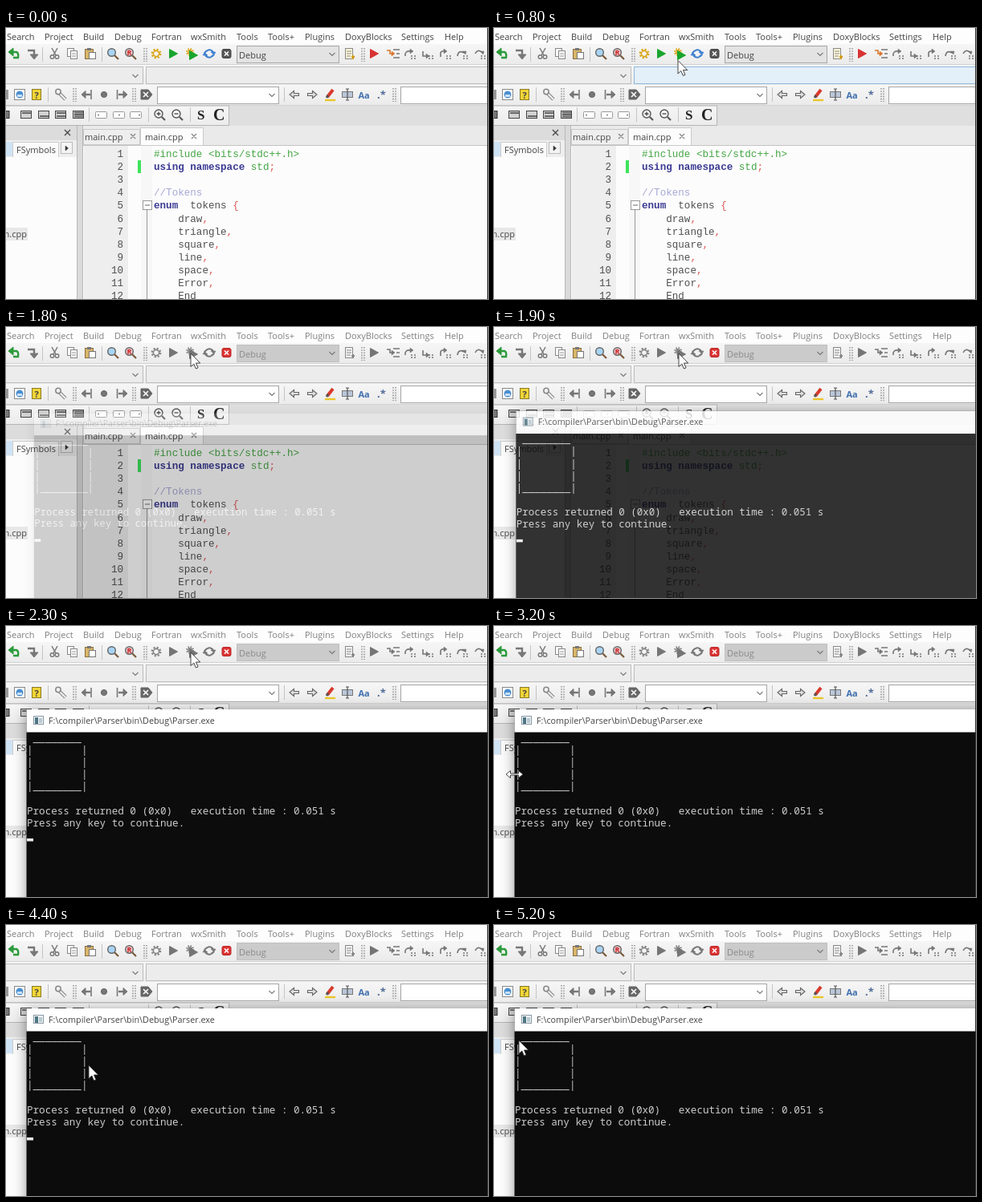
An HTML page for the animation above (5300 ms loop, 600 by 338 pixels).

```html
<!DOCTYPE html>
<html lang="en">
<head>
<meta charset="utf-8">
<title>Compile and run</title>
<style>
html, body { margin: 0; width: 100%; height: 100%; overflow: hidden; background: #f0f0f0; }
svg { display: block; width: 600px; height: 338px; }
text { white-space: pre; }
.ui { font: 11px "Open Sans", "Noto Sans", sans-serif; fill: #444; }
.code { font: 12.58px "Liberation Mono", monospace; fill: #505050; }
.con { font: 12.58px "Noto Sans Mono", monospace; fill: #ccc; }
.serif { font: bold 17px "Liberation Serif", serif; fill: #222; }
.kw { fill: #3a3a92; font-weight: bold; }
.pre { fill: #45a545; }
.rem { fill: #a8a8d6; }
.op { fill: #e25555; }
</style>
</head>
<body>
<svg id="stage" viewBox="0 0 600 338"></svg>
<script>
const LOOP = 5300, STEP = 100;

// Markup helpers
const rect = (x, y, w, h, fill, stroke = 'none', more = '') =>
  `<rect x="${x}" y="${y}" width="${w}" height="${h}" fill="${fill}" stroke="${stroke}" ${more}/>`;
const path = (d, stroke, w = 1, fill = 'none', more = '') =>
  `<path d="${d}" stroke="${stroke}" stroke-width="${w}" fill="${fill}" ${more}/>`;
const circle = (x, y, r, fill, stroke = 'none', w = 1, more = '') =>
  `<circle cx="${x}" cy="${y}" r="${r}" fill="${fill}" stroke="${stroke}" stroke-width="${w}" ${more}/>`;
const text = (x, y, s, cls = 'ui', more = '') => `<text x="${x}" y="${y}" class="${cls}" ${more}>${s}</text>`;
const span = (cls, s) => `<tspan class="${cls}">${s}</tspan>`;
const group = (id, body, more = '') => `<g id="${id}" ${more}>${body}</g>`;

const sep = (x, y) => path(`M${x}.5 ${y - 9}v18`, '#c4c4c4');
const grip = (x, y) => path(`M${x} ${y - 8}v17M${x + 3} ${y - 8}v17`, '#9a9a9a', 1.6, 'none', 'stroke-dasharray="1.6 1.6"');
const chevron = (x, y) => path(`M${x - 3.5} ${y - 2}l3.5 3.5 3.5-3.5`, '#777', 1.1);
const play = (x, y, c) => path(`M${x - 4.5} ${y - 5.5}l10 5.5-10 5.5z`, c, 1, c);
const gear = (x, y, r, c) =>
  circle(x, y, r, 'none', c, 2.4, `stroke-dasharray="${r * .393} ${r * .393}"`) + circle(x, y, r - 1.6, '#f4f4f4', c, 1.6);
const lens = (x, y, c) =>
  path(`M${x + 2} ${y + 2}l5 5`, '#7a5a3a', 2.2) + circle(x - 1.5, y - 1.5, 4.8, c, '#666', 1.4);
const arrow = (x, y, dir, c) =>
  path(`M${x - 5 * dir} ${y}h${8 * dir}`, c, 2.4) +
  path(`M${x + dir} ${y - 4.5}l${5 * dir} 4.5 ${-5 * dir} 4.5z`, c, 1, c);
const hollowArrow = (x, y, dir) =>
  path(`M${x - 5.5 * dir} ${y - 1.5}h${6 * dir}v-3l${5.5 * dir} 4.5 ${-5.5 * dir} 4.5v-3h${-6 * dir}z`, '#666', 1.1, '#ddd');

// Debugger stepping glyph: lines of code with a bent arrow
function stepIcon(x, kind, accent) {
  const bends = ['M-8-4h4v4h3', 'M-6 3q-1-7 7-6', 'M-6-3v6h5', 'M-6 4v-5q1-3 5-2', 'M-6 3q1-8 8-4', 'M-6 0q3-6 8-2'];
  const heads = ['M-2-3v6l4-3z', 'M0-6v6l4-3z', 'M-2 0v6l4-3z', 'M-2-6v6l4-3z', 'M0-3h5l-1 4z', 'M0-3h5l-1 4z'];
  const bars = kind ? 'M1 3h2M5 3h2M1 6h2M5 6h2' : 'M0-5h8M4 0h4M0 5h8';
  return `<g transform="translate(${x} 32)">` + path(bars, '#777', 1.7) + path(bends[kind], accent, 1.6) +
    path(heads[kind], accent, .5, accent) + '</g>';
}

function buildTools(on) {
  const pick = (c, g = '#858585') => on ? c : g;
  let s = gear(187, 32, 5.2, pick('#d9a514')) + play(208, 32, pick('#18a52c', '#757575'));
  s += gear(229, 30, 3.8, pick('#d9a514')) + play(233, 34, pick('#18a52c', '#757575'));
  const blue = pick('#3f7fd0', '#777');
  s += path('M247 31q6-7 11-1M259 33q-6 7-11 1', blue, 2.2) +
    path('M255 30h6l-2 3.5zM245 34h6l-4-3.5z', blue, .6, blue);
  s += rect(269, 26.5, 11, 11, pick('#555', '#dc3434'), pick('#444', '#b92626'), 'rx="2"') +
    path('M272 29.5l5 5m0-5l-5 5', '#fff', 1.7);
  s += rect(287.5, 22.5, 127, 21, on ? '#e3e3e3' : '#cbcbcb', on ? '#a6a6a6' : '#c0c0c0') +
    text(290, 37.5, 'Debug', 'ui', on ? '' : 'style="fill:#8a8a8a"') + chevron(406, 33);
  s += rect(422.5, 25.5, 9, 13, on ? '#fff8d8' : '#f3f3f3', '#888') +
    path('M424 29h6M424 32h6M424 35h5', '#888') + path('M430 36h4m-2-2v5', pick('#d19a13'), 2);
  s += play(458, 32, pick('#d83232', '#757575'));
  [482, 503, 525, 547, 568, 590].forEach((x, i) =>
    s += stepIcon(x, i, on && i < 1 ? '#d9762c' : '#757575'));
  return s;
}

function buildMenu() {
  const menu = [['Search', 1], ['Project', 48], ['Build', 96], ['Debug', 135], ['Fortran', 181], ['wxSmith', 230],
    ['Tools', 287], ['Tools+', 326], ['Plugins', 372], ['DoxyBlocks', 422], ['Settings', 492], ['Help', 546]];
  return menu.map(([label, x]) => text(x, 15, label, 'ui', 'style="fill:inherit"')).join('');
}

function buildBars() {
  let s = rect(0, 0, 600, 338, '#f0f0f0') + rect(0, 0, 600, 20, '#fdfdfd');
  [20, 46, 71].forEach(y => s += rect(0, y, 600, 25, 'url(#bar)') + path(`M0 ${y + 25}.5h600`, '#d2d2d2'));
  s += rect(0, 97, 600, 25, '#dfdfdf') + rect(-1, 97, 278.5, 24.5, 'url(#bar)', '#b4b4b4');

  // First row
  s += path('M6 30h7q3 1 2 7h-6', '#2b9b3a', 2.4) + path('M9 25v10l-6-5z', '#2b9b3a', 1, '#2b9b3a');
  s += path('M27 28h8v5', '#777', 2.4) + path('M30 33h10l-5 6z', '#777', 1, '#777') + sep(45, 33);
  s += path('M57 25l5 9M64 25l-5 9', '#777', 1.5) + circle(57.5, 36, 2.3, 'none', '#777', 1.4) + circle(63.5, 36, 2.3, 'none', '#777', 1.4);
  s += rect(76.5, 25.5, 8, 10, '#fafafa', '#888') + rect(80.5, 28.5, 8, 10, '#fafafa', '#888') + path('M82 32h5M82 35h5', '#999');
  s += rect(98.5, 26.5, 10, 12, '#d8b56a', '#8b7040') + rect(101, 25, 5, 3, '#777') + rect(103.5, 30.5, 8, 8, '#fff', '#777');
  s += sep(119, 33) + lens(133, 32, '#a9d4f2') + lens(155, 32, '#e8c8cc') +
    text(150.5, 34, 'R', 'ui', 'style="font-size:9px;font-weight:bold;fill:#c22"') + grip(172, 33) + grip(443, 33);

  // Second row
  s += rect(-1, 48.5, 171.5, 21, '#ececec', '#bdbdbd') + chevron(161, 60);

  // Third row
  s += rect(0, 77, 3, 12, '#999') + rect(10.5, 76.5, 13, 13, '#fff', '#888') + circle(17, 83, 4.5, '#4a8fd0') + rect(14, 83, 6, 3, '#c9e0f4');
  s += rect(32.5, 76.5, 11, 13, '#f1d437', '#8a7a22') + text(35.5, 87.5, '?', 'ui', 'style="font-weight:bold"');
  s += sep(52, 83) + path('M66 81l8 8', '#888', 4.4) + path('M66 81l8 8', '#f0f0f0', 2.2) + circle(65, 79.5, 3.2, '#f0f0f0', '#888', 1.5);
  s += grip(84, 83) + arrow(100, 83, -1, '#777') + path('M106 77v12', '#777', 1.6) + circle(122, 83, 3.6, '#777', '#666');
  s += arrow(145, 83, 1, '#777') + path('M138.5 77v12', '#777', 1.6) + grip(158, 83);
  s += path('M168 77h9l5 6-5 6h-9z', '#666', 1, '#666') + path('M171 80l6 6m0-6l-6 6', '#fff', 1.6);
  s += rect(188.5, 73.5, 151, 21, '#fff', '#a6a6a6') + chevron(331, 84) + sep(346, 83);
  s += hollowArrow(359, 83, -1) + hollowArrow(381, 83, 1);
  s += path('M400 86l7-9', '#d63a2c', 4) + path('M399 87l2-3', '#555', 3) + path('M397 90h13', '#eac62c', 2.4);
  s += rect(418.5, 79.5, 13, 7, '#b9c6d8', '#777') + path('M425 76v14M423 76h4M423 90h4', '#555', 1.2);
  s += text(438.5, 87.5, 'Aa', 'ui', 'style="font-weight:bold;fill:#3f6fae"') + text(462, 88, '.*', 'ui', 'style="font-weight:bold;font-size:13px;fill:#4f6a95"');
  s += grip(482, 83) + rect(491.5, 73.5, 120, 21, '#fff', '#a6a6a6');

  // Fourth row
  s += rect(-5, 103.5, 9, 9, '#777', '#333');
  [[25, 'M20 106h11'], [47, 'M42 110h11'], [68, 'M63 106h11M63 110h11'], [90, 'M85 105.5h11M85 108h11M85 110.5h11']].forEach(([x, d]) =>
    s += rect(x - 6.5, 103.5, 13, 9, '#d2d2d2', '#444') + path(d, '#666', 2));
  s += sep(103, 108) + sep(177, 108) + sep(229, 108);
  [119, 141, 162].forEach((x, i) =>
    s += rect(x - 7.5, 104.5, 14, 8, '#fff', '#999', 'rx="1"') + path(`M${x - 5 + i * 4} 108.5h2`, '#999', 2));
  [191, 213].forEach((x, i) =>
    s += circle(x - 1, 107, 5, '#f8f8f8', '#555', 1.4) + path(`M${x + 3} 111l4 4`, '#555', 2.2) +
      path(`M${x - 3.5} 107h5` + (i ? '' : `M${x - 1} 104.5v5`), '#444', 1.3));
  return s + text(238, 114, 'S', 'serif') + text(258, 115, 'C', 'serif', 'style="font-size:20px"');
}

function buildEditor() {
  let s = rect(0, 122, 600, 216, '#e6e6e6') + rect(0, 122, 88, 18, '#dcdcdc') + path('M73 127l7 7m0-7l-7 7', '#444', 1.3);
  s += rect(0, 140, 88, 21, '#eee') + rect(0, 142, 8, 18, '#cfe3f5') + rect(8.5, 142.5, 57, 19, '#fafafa', '#ccc') + text(13, 155.5, 'FSymbols');
  s += rect(68.5, 142.5, 14, 14, '#f4f4f4', '#bbb') + path('M74 147v6l3.5-3z', '#333', .5, '#333');
  s += rect(0, 161, 88, 177, '#fcfcfc') + rect(0, 249, 27, 16, '#e8e8e8') + text(-2.5, 260.5, 'n.cpp');
  s += rect(88, 122, 8, 216, '#dadada') + path('M88.5 122v216M95.5 122v216', '#b8b8b8') + rect(96, 122, 504, 24, '#eaeaea');
  s += rect(96.5, 126.5, 70, 19, '#eee', '#cacaca') + rect(167.5, 124.5, 78, 22, '#fcfcfc', '#cacaca');
  s += text(98, 140, 'main.cpp') + text(173, 139.5, 'main.cpp');
  s += path('M155 132l6 6m0-6l-6 6M231 132l6 6m0-6l-6 6', '#888', 1.4);
  s += path('M96 146.5h71M246 146.5h354', '#c4c4c4') + rect(96, 147, 504, 191, '#fcfcfc') + rect(97, 147, 55, 191, '#eee') + rect(168, 147, 14, 191, '#f7f7f7');
  s += rect(164, 165, 4, 16, '#3de35a') + path('M175.5 227v111', '#999') + rect(170.5, 215.5, 11, 11, '#fff', '#999') + path('M173 221h6', '#666');

  const item = (name, comma = ',') => '    ' + name + span('op', comma);
  const lines = [
    span('pre', '#include &lt;bits/stdc++.h&gt;'),
    span('kw', 'using namespace') + span('pre', ' std') + span('op', ';'), '',
    span('rem', '//Tokens'),
    span('kw', 'enum') + '  tokens ' + span('op', '{'),
    ...['draw', 'triangle', 'square', 'line', 'space', 'Error'].map(n => item(n)), item('End', '')
  ];
  lines.forEach((line, i) => {
    const y = 161 + 16.1 * i;
    s += text(146, y, i + 1, 'code', 'text-anchor="end"') + text(184, y, line, 'code');
  });
  return s;
}

function buildConsole() {
  let s = rect(25.5, 104, 700, 400, '#0c0c0c') + rect(25.5, 104, 700, 28.5, '#fff');
  s += rect(34.5, 112.5, 12, 10, '#f2f5f7', '#8a98a3') + rect(36, 114, 4, 8, '#4d7584') + rect(41, 115, 4, 6, '#b9c9d1');
  s += text(53, 121.5, 'F:\\compiler\\Parser\\bin\\Debug\\Parser.exe', 'ui', 'style="font-size:10.8px"');
  const side = '|        |', base = '________';
  const rows = [' ' + base, side, side, side, `|${base}|`, '',
    'Process returned 0 (0x0)   execution time : 0.051 s', 'Press any key to continue.'];
  rows.forEach((row, i) => s += text(26, 144 + 15.1 * i, row, 'con'));
  return s + rect(26, 265, 8, 3.5, '#f0f0f0', 'none', 'id="caret"');
}

const stage = document.getElementById('stage');
stage.innerHTML =
  '<defs><linearGradient id="bar" x2="0" y2="1"><stop stop-color="#f6f6f6"/><stop offset="1" stop-color="#ebebeb"/></linearGradient></defs>' +
  buildBars() + group('menu', buildMenu()) + rect(174.5, 48.5, 440, 21, '#ececec', '#bdbdbd', 'id="field"') +
  group('live', buildTools(true)) + group('busy', buildTools(false)) +
  buildEditor() + group('win', buildConsole(), 'style="filter:drop-shadow(0 3px 8px rgba(0,0,0,.42))"') +
  rect(599, 0, 1, 338, '#333') +
  group('arrow', path('M0 0V16.5L3.8 13 6.4 19 9 17.9 6.5 12H11.8Z', '#333', .9, '#fff')) +
  group('resize', path('M-10.5 0l5.5-4.5v3.5h10v-3.5l5.5 4.5-5.5 4.5v-3.5h-10v3.5z', '#333', .9, '#fff'));

const el = Object.fromEntries(['menu', 'field', 'live', 'busy', 'win', 'caret', 'arrow', 'resize']
  .map(id => [id, document.getElementById(id)]));
const show = (node, on) => node.setAttribute('display', on ? 'inline' : 'none');

// Pointer stops: time, x, y
const route = [[500, 312, 338], [600, 294, 265], [700, 256, 135], [800, 229, 40.5], [900, 230, 33], [2500, 230, 33],
  [3000, 25.5, 185], [3600, 25.5, 185], [3900, 78, 190], [4400, 103, 175], [4800, 62, 128], [5200, 31, 144], [5300, 31, 144]];

function pointer(t) {
  const i = Math.max(1, route.findIndex(p => p[0] >= t));
  const [a, b] = [route[i - 1], route[i]];
  const k = Math.min(1, Math.max(0, (t - a[0]) / (b[0] - a[0])));
  const e = k * k * (3 - 2 * k);
  return [a[1] + (b[1] - a[1]) * e, a[2] + (b[2] - a[2]) * e];
}

function draw(t) {
  const busy = t >= 1300;
  show(el.live, !busy);
  show(el.busy, busy);
  el.menu.setAttribute('fill', busy ? '#808080' : '#444');
  const hover = t >= 800 && t < 900;
  el.field.setAttribute('fill', hover ? '#e3eff9' : '#ececec');
  el.field.setAttribute('stroke', hover ? '#8fb8dc' : '#bdbdbd');

  const k = Math.min(1, Math.max(0, (t - 1780) / 200));
  const rise = 1 - (1 - k) ** 2;
  show(el.win, k > 0);
  el.win.style.opacity = rise;
  el.win.setAttribute('transform', `translate(411 240) scale(${1 - .03 * (1 - rise)}) translate(-411 -240)`);
  show(el.caret, t < 2000 || (t - 2210) % 1060 < 530 && t >= 2210);

  const sizing = t >= 3000 && t < 3700;
  const at = `translate(${pointer(t).join(' ')})`;
  show(el.arrow, t >= 500 && !sizing);
  show(el.resize, sizing);
  el.arrow.setAttribute('transform', at);
  el.resize.setAttribute('transform', at);
}

const start = performance.now();
function tick() {
  const t = (performance.now() - start) % LOOP;
  draw(Math.floor(t / STEP) * STEP);
  requestAnimationFrame(tick);
}
tick();
</script>
</body>
</html>
```
